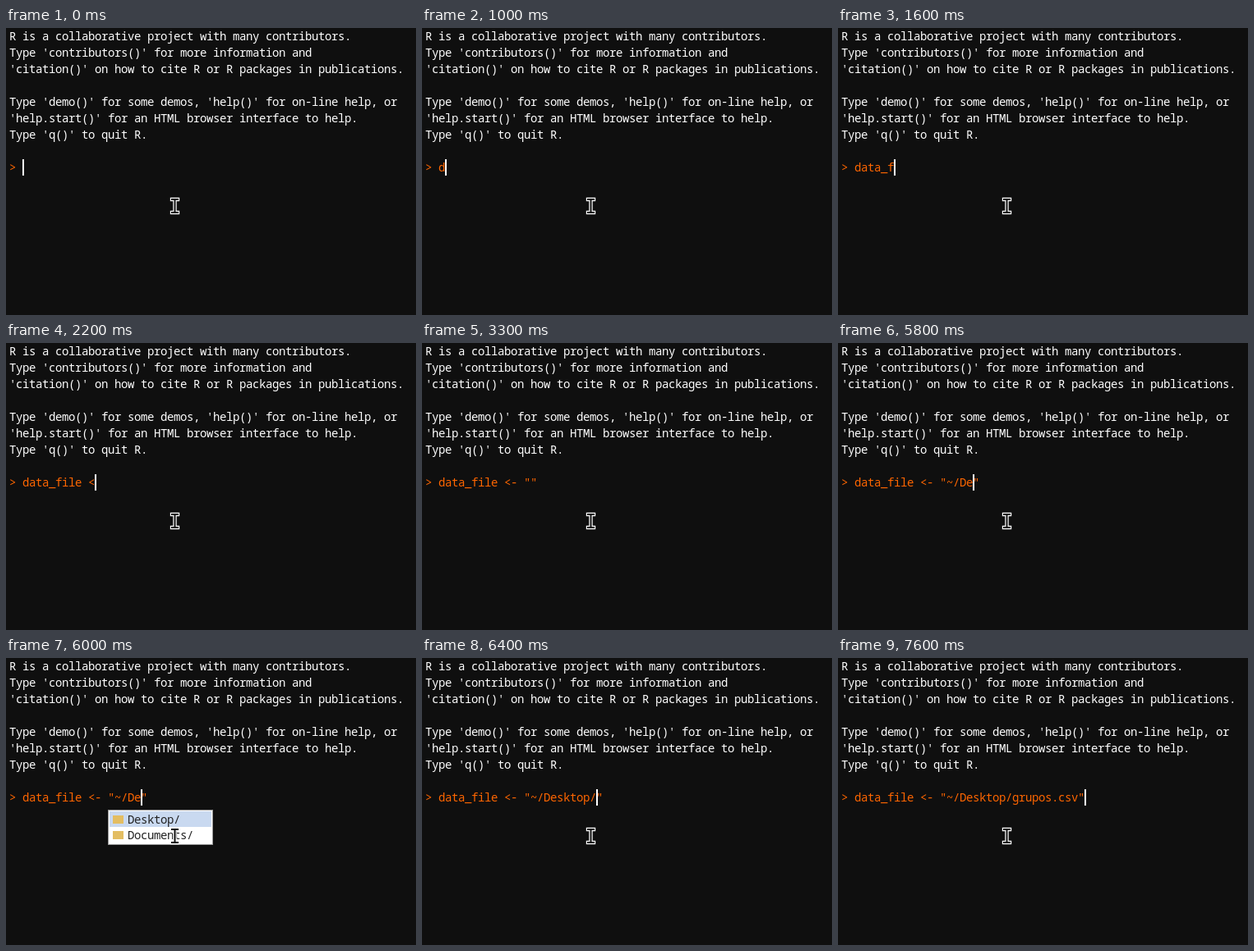
An HTML page that plays this animation: 499x350 px, repeating every 8000 ms.

```html
<!DOCTYPE html>
<html lang="en">
<head>
<meta charset="utf-8">
<title>R console</title>
<style>
  html, body { margin: 0; width: 100%; height: 100%; overflow: hidden; background: #0f0f0f; }
  #stage { position: relative; width: 499px; height: 350px; overflow: hidden; background: #0f0f0f; }
  pre, .popup { font: 14px/20px "Noto Sans Mono", monospace; letter-spacing: -0.4px; }
  pre { position: absolute; left: 4px; margin: 0; color: #fff; }
  #input { top: 160px; color: #f60; }
  #caret { position: absolute; top: 160px; width: 2px; height: 20px; background: #fff; }
  .popup {
    position: absolute; left: 124px; top: 185px; width: 128px; height: 43px;
    box-sizing: border-box; padding: 1px; border: 1px solid #999; background: #fff; color: #222;
  }
  .popup div { height: 19px; line-height: 19px; padding-left: 22px; position: relative; }
  .popup div:first-child { background: #c9d9f0; }
  .popup div::before {
    content: ""; position: absolute; left: 4px; top: 5px; width: 13px; height: 10px; background: #e3bd62;
  }
  svg { position: absolute; left: 0; top: 0; fill: none; stroke-linecap: square; }
</style>
</head>
<body>
<div id="stage">
<pre>R is a collaborative project with many contributors.
Type 'contributors()' for more information and
'citation()' on how to cite R or R packages in publications.

Type 'demo()' for some demos, 'help()' for on-line help, or
'help.start()' for an HTML browser interface to help.
Type 'q()' to quit R.</pre>
<pre id="input"></pre>
<div id="caret"></div>
<div class="popup" id="popup"><div>Desktop/</div><div>Documents/</div></div>
<svg width="499" height="350">
  <defs><path id="beam" d="M202 209H209M205.5 209V225M202 225H209"/></defs>
  <use href="#beam" stroke="#fff" stroke-width="4.4"/>
  <use href="#beam" stroke="#0f0f0f" stroke-width="2"/>
</svg>
</div>
<script>
const LOOP = 8000, CELL = 8, INPUT_X = 20, KEY_MS = 100;
const QUOTE_OPEN = 2600, QUOTE_PASSED = 7600;
const input = document.getElementById('input');
const caret = document.getElementById('caret');
const popup = document.getElementById('popup');

// Text typed one key at a time from a start time
const keys = (start, text) => [...text].map((ch, i) => [start + i * KEY_MS, ch]);
const edits = [
  ...keys(1000, 'data'), ...keys(1500, '_file'), ...keys(2100, ' <- '),
  [QUOTE_OPEN, '"'], ...keys(3500, '~/'), [5600, 'D'], [5800, 'e'],
  [6400, 'sktop/'], [7000, 'grupos.csv'], [QUOTE_PASSED, '"']
];
const caretOff = [[300, 700], [3300, 3400], [4200, 4600], [5200, 5600]];
const within = (t, [from, to]) => t >= from && t < to;
const show = (el, on) => { el.style.visibility = on ? 'visible' : 'hidden'; };

function draw(now) {
  const t = now % LOOP;
  const typed = edits.filter(([at]) => at <= t).map(([, text]) => text).join('');
  // The editor adds the closing quote until it is typed over
  const closing = within(t, [QUOTE_OPEN, QUOTE_PASSED]) ? '"' : '';
  input.textContent = '> ' + typed + closing;
  caret.style.left = INPUT_X + typed.length * CELL + 'px';
  show(caret, !caretOff.some(span => within(t, span)));
  show(popup, within(t, [6000, 6400]));
  requestAnimationFrame(draw);
}
draw(0);
</script>
</body>
</html>
```
